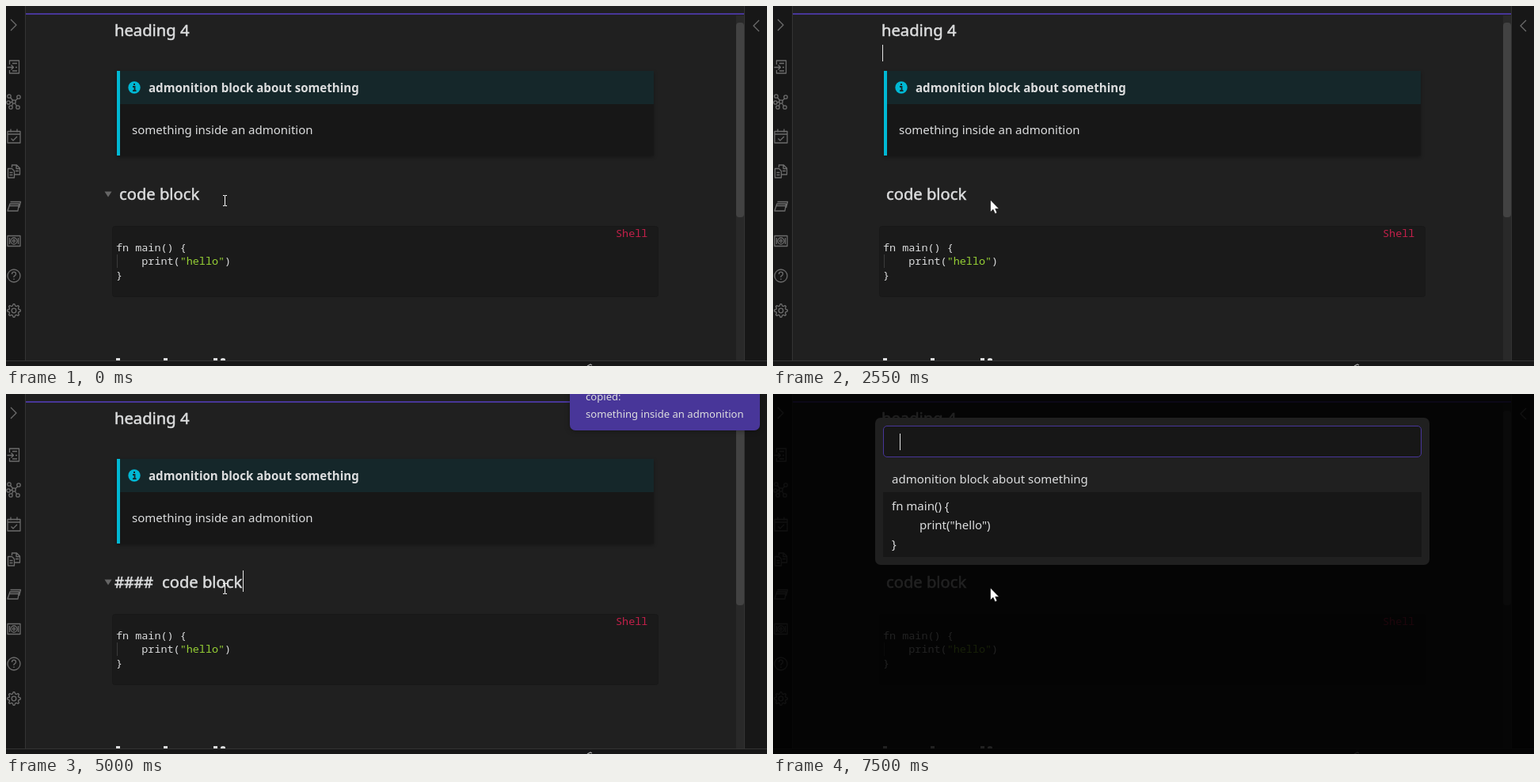
These frames come from a looping animation (961 by 455 pixels, 8 s). An HTML page:

```html
<!DOCTYPE html>
<html lang="en">
<head>
<meta charset="utf-8">
<style>
  html, body { margin: 0; height: 100%; overflow: hidden; background: #202020; }
  svg { display: block; }
  text { font: 15px "Noto Sans", sans-serif; fill: #dcddde; white-space: pre; }
  /* A thin outline gives the semi-bold weight. */
  .heading { font-size: 20.2px; stroke: #dcddde; stroke-width: .5; }
  .bold { font-size: 15.1px; font-weight: 700; }
  .code { font: 13.45px "Noto Sans Mono", monospace; }
  .small { font-size: 13.1px; }
  .icons { fill: none; stroke: #6c6c6c; stroke-width: 1.3; stroke-linejoin: round; }
  .caret { fill: #e4e4e4; }
</style>
</head>
<body>
<svg width="961" height="455" viewBox="0 0 961 455">
  <rect width="961" height="455" fill="#202020"/>

  <!-- Note -->
  <text class="heading" x="137" y="38">heading 4</text>
  <text id="pasted" x="137" y="66">something inside an admonition</text>
  <rect id="noteCaret" class="caret" x="138" y="49" width="1" height="21"/>
  <rect id="pastedCaret" class="caret" x="366" y="49" width="1" height="21"/>
  <rect id="lineCaret" class="caret" x="138" y="200" width="1" height="21"/>

  <rect x="140" y="82" width="678" height="107" fill="#171717" style="filter:drop-shadow(0 2px 2px #0005)"/>
  <rect x="144" y="82" width="674" height="42" fill="#15272a"/>
  <rect x="140" y="82" width="4" height="107" fill="#00b8d4"/>
  <circle cx="162" cy="103" r="7.7" fill="#00b8d4"/>
  <path d="M160 102h2.5v5M160 107.2h4.5M161 99h2" fill="none" stroke="#15272a" stroke-width="1.8"/>
  <text class="bold" x="180" y="109">admonition block about something</text>
  <text x="159" y="162">something inside an admonition</text>

  <path id="fold" d="M124.5 234.5h9l-4.5 7z" fill="#666"/>
  <text id="hashes" class="heading" x="137" y="245" style="font-size:19px">####</text>
  <text id="title" class="heading" y="245">code block</text>
  <rect id="titleCaret" class="caret" x="299" y="223" width="1" height="27"/>

  <rect x="134.5" y="278.5" width="689" height="89" rx="3" fill="#1a1a1a" stroke="#181818"/>
  <rect x="140" y="314" width="1" height="17" fill="#3a3a3a"/>
  <text class="code" x="139" y="310">fn main() {</text>
  <text class="code" x="171.3" y="327">print(<tspan fill="#96d035">"hello"</tspan>)</text>
  <text class="code" x="139" y="345">}</text>
  <text class="code" x="770" y="292" style="fill:#c3204a">Shell</text>

  <!-- Tops of the next, cut-off heading -->
  <path d="M139 445h5v3h-5zM199 445h5v3h-5zM262 445h5v3h-5zM271 448v-1q0-2 3-2t3 2v1z" fill="#dcddde"/>

  <!-- Window frame -->
  <rect x="25" y="9" width="907" height="2" fill="#483699"/>
  <rect x="922" y="12" width="10" height="436" fill="#292929"/>
  <rect x="922" y="21" width="10" height="246" rx="4" fill="#424242"/>
  <path d="M0 0h24v455h-24zM933 0h28v455h-28zM0 449h961v6h-961z" fill="#171717"/>
  <path d="M24 0h1v448h-1zM932 0h1v448h-1zM0 448h961v1h-961z" fill="#333"/>
  <path d="M734 455l4-2 2 1" fill="none" stroke="#aaa" stroke-width="1.3"/>
  <g class="icons">
    <path d="M6 17l7 7-7 7M951 18l-7 7 7 7"/>
    <path d="M4.5 74v-5h12v16h-12v-4M1.5 77.5h8m-3-3l3 3-3 3M8 72.5h6M12 77.5h2M8 82h6"/>
    <path d="M10 121L5 115M10 121l6-5M10 121l-6 1M10 121l4 6M10 121l-3 6"/>
    <g id="nodes"></g>
    <path d="M2 158.5h16v14.5h-16zM2 162h16M6 155.5v4M14 155.5v4M6.500 167.500l2.500 2.500 5-5"/>
    <path d="M7.500 204v-3h6l4 4v8h-7M13 201v4.500h4.500M2.500 205.500h5l3 3v8.500h-8zM4.500 210.500h4M4.500 213.500h4M12 208.500h4"/>
    <path d="M5.500 247.500h13l-2 7.500M5 250h11.500l-1.500 9h-13zM4.500 252.500h11"/>
    <path d="M2 290.500h16v13h-16zM4.500 293v8M15.500 293v8"/>
    <circle cx="10" cy="297" r="4"/><circle cx="10" cy="297" r="1.5"/>
    <circle cx="10" cy="341" r="8"/>
    <path d="M7.500 339q0-2.800 2.500-2.800t2.500 2.500q0 1.300-1.500 2.200t-1 2.100M10 344.500v1.500"/>
    <path id="gear"/><circle cx="10" cy="385" r="2.8"/>
  </g>

  <g id="modal">
    <rect width="961" height="455" opacity=".85"/>
    <rect x="129" y="30" width="700" height="186" rx="7" fill="#202020"/>
    <rect x="139.5" y="40.5" width="679" height="39" rx="4.5" fill="#171717" stroke="#483699"/>
    <rect id="modalCaret" class="caret" x="160" y="50" width="1" height="21"/>
    <rect id="selection" x="139" width="680" fill="#171717"/>
    <text x="150" y="113">admonition block about something</text>
    <text x="150" y="147">fn main() {</text>
    <text x="185" y="171">print("hello")</text>
    <text x="150" y="195">}</text>
  </g>

  <g id="notice">
    <rect x="712" y="-30" width="240" height="76" rx="7" fill="#483699" style="filter:drop-shadow(0 1px 3px #0005)"/>
    <text class="small" x="732" y="8">copied:</text>
    <text class="small" x="732" y="30">something inside an admonition</text>
  </g>

  <path id="beam" d="M274 239.500h2l.5.500.500-.500h2M276.500 240v12M274 252.500h2l.5-.500.500.500h2" fill="none" stroke="#fff"/>
  <path id="arrow" d="M274.500 245v15.500l3.500-3.300 2.400 5.300 2.600-1.100-2.300-5.100h4.800z" fill="#fff" stroke="#000" stroke-width=".6"/>
</svg>
<script>
  const $ = id => document.getElementById(id);
  const LOOP = 8000, STEP = 50;

  // Spans of visibility in ms: start, end, start, end, ...
  const visible = {
    noteCaret: [450, 700, 2550, 3200, 4550, 5000],
    pasted: [3350, 4300],
    pastedCaret: [3350, 3950],
    hashes: [5000, 5350, 5700, 6300],
    titleCaret: [5000, 5350, 5700, 6300],
    lineCaret: [5350, 5700],
    modal: [700, 2550, 6300, LOOP],
    modalCaret: [700, 1350, 1950, 2550, 6300, 6900, 7500, LOOP],
    arrow: [700, 2600, 6300, LOOP],
    beam: [0, 700, 2600, 6300],
    fold: [0, 700, 2600, 6300],
  };
  const secondItem = [1300, 2150, 6650, LOOP];

  // An odd number of passed edges means t lies inside a span.
  const within = (spans, t) => spans.filter(edge => edge <= t).length % 2 === 1;
  const clamp = v => Math.max(0, Math.min(1, v));

  $('nodes').innerHTML = [[4, 114], [16, 115], [3, 122], [15, 128], [6, 128], [10, 121]]
    .map(([x, y]) => `<circle cx="${x}" cy="${y}" r="2.2" fill="#171717"/>`).join('');

  const gearPoints = Array.from({ length: 32 }, (_, i) => {
    const angle = (i - 0.5) * Math.PI / 16, r = i % 4 < 2 ? 8.3 : 6.2;
    return `${10 + r * Math.cos(angle)} ${385 + r * Math.sin(angle)}`;
  });
  $('gear').setAttribute('d', `M${gearPoints.join('L')}z`);

  function draw() {
    const t = Math.floor(performance.now() % LOOP / STEP) * STEP;
    for (const id in visible) $(id).style.display = within(visible[id], t) ? '' : 'none';
    $('title').setAttribute('x', within(visible.hashes, t) ? 197 : 143);
    const second = within(secondItem, t);
    $('selection').setAttribute('y', second ? 124 : 90);
    $('selection').setAttribute('height', second ? 82 : 34);
    $('notice').style.opacity = Math.min(clamp((t - 2600) / 150), clamp((6900 - t) / 150));
    requestAnimationFrame(draw);
  }
  draw();
</script>
</body>
</html>
```
